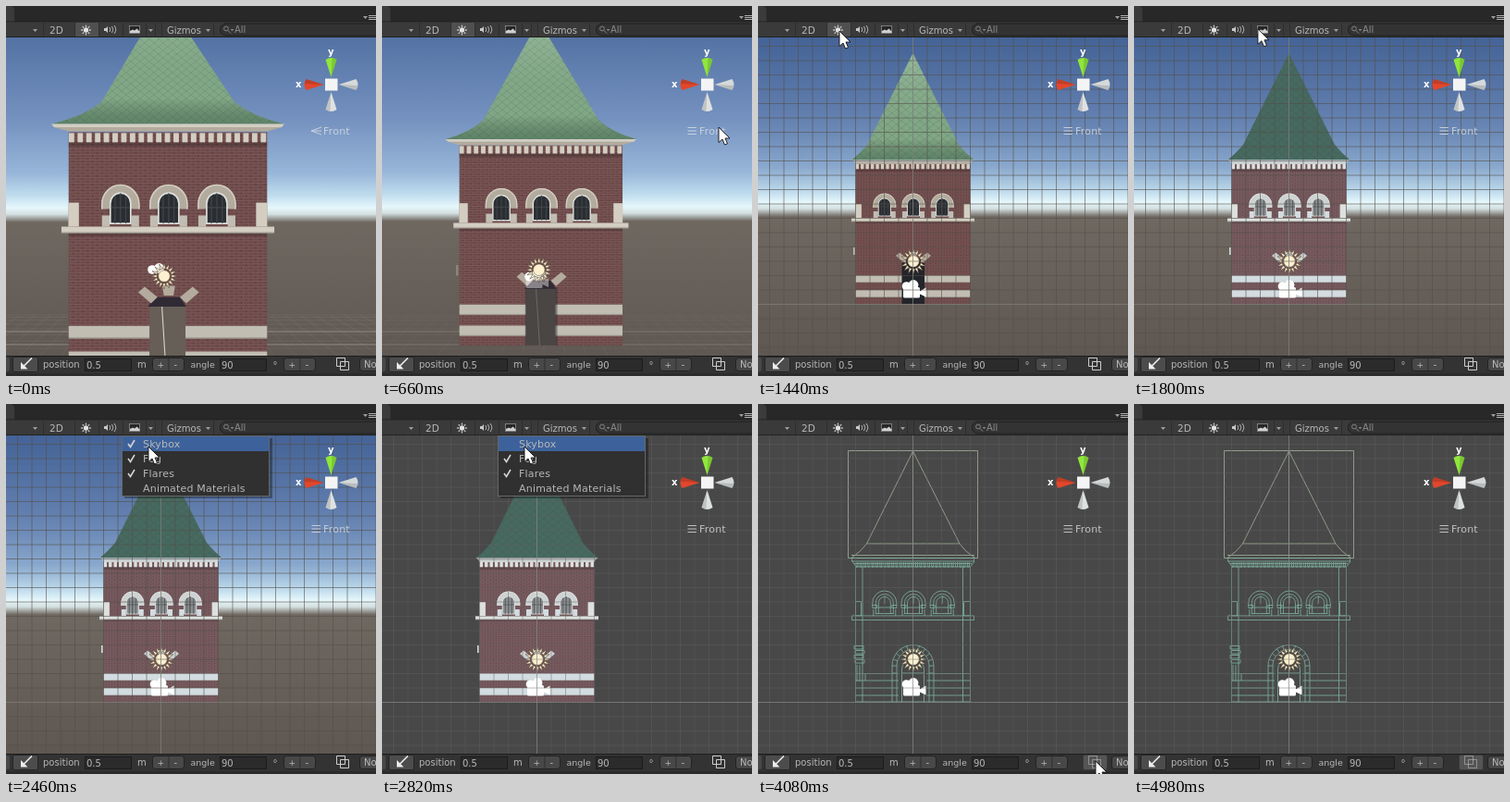
Write an HTML page that moves like this. It is 400 px wide and 400 px high and loops after 6360 ms.

```html
<!DOCTYPE html>
<html lang="en">
<head>
<meta charset="utf-8">
<title>Scene view</title>
<style>
html, body { margin: 0; width: 100%; height: 100%; overflow: hidden; background: #282828; }
svg { display: block; width: 100vw; height: 100vh; }
text { font-family: "DejaVu Sans", sans-serif; font-size: 10px; fill: #b8b8b8; white-space: pre; }
.big { font-size: 11px; letter-spacing: .2px; }
#model { --wall: #6d4949; --stone: #c1bdb3; --trim: #d3cec1; --arch: #b3ab9d; --roof: #86ae8b; --glass: #2a2e32; --bars: #43474b; --door: #23252a; }
#model.flat { --wall: #705459; --stone: #d3dce0; --trim: #dde0de; --arch: #cdd2d2; --roof: #47695f; --glass: #8b9092; --bars: #45484c; }
#model.flat #shade, #model.flat #opening { display: none; }
#wire path { fill: none; stroke: #7fb3a3; stroke-width: .8; }
</style>
</head>
<body>
<svg id="stage" viewBox="0 0 400 400"></svg>
<script>
const rect = (x, y, w, h, fill, more = '') => `<rect x="${x}" y="${y}" width="${w}" height="${h}" fill="${fill}" ${more}/>`;
const path = (d, fill = 'none', more = '') => `<path d="${d}" fill="${fill}" ${more}/>`;
const disc = (x, y, r, fill, more = '') => `<circle cx="${x}" cy="${y}" r="${r}" fill="${fill}" ${more}/>`;
const text = (x, y, s, more = '') => `<text x="${x}" y="${y}" ${more}>${s}</text>`;
const rep = (n, f) => Array.from({ length: n }, (_, i) => f(i)).join('');
const box = (x, y, w, h) => `M${x} ${y}h${w}v${h}h${-w}z`;
const drop = (x, y) => path(`M${x} ${y}h5l-2.5 3z`, '#a0a0a0');
const rays = (n, r1, r2, w) => rep(n, i => path(`M${-w} ${-r1}L0 ${-r2}L${w} ${-r1}z`, 'inherit', `transform="rotate(${i * 360 / n})"`));

const MID = 167.5, BASE = 322, CELL = 15.5;
const windows = [136.8, 168, 199.2];

function arch(x, r, y, foot) {
  return `M${x - r} ${foot}V${y}A${r} ${r} 0 0 1 ${x + r} ${y}V${foot}`;
}

function windowShape(x) {
  return path(arch(x, 12.4, 215, 218) + 'z', 'var(--arch)') +
    path(arch(x, 12, 215, 218), 'none', 'stroke="var(--trim)" stroke-width=".9"') +
    rect(x - 8.2, 218, 16.4, 10.5, 'var(--wall)') +
    rect(x - 12, 222, 5, 7, 'var(--stone)') + rect(x + 7, 222, 5, 7, 'var(--stone)') +
    path(arch(x, 6.6, 214.5, 227) + 'z', 'var(--glass)', 'stroke="#dfe2de" stroke-width="1"') +
    path(`M${x} 208v19M${x - 3.5} 210v17M${x + 3.5} 210v17M${x - 6} 217h12`, 'none', 'stroke="var(--bars)" stroke-width=".7"');
}

function band(y) {
  return rect(105.5, y, 124, 8, 'var(--stone)') + rect(105.5, y + 7.2, 124, .8, '#0003');
}

function building() {
  return `<g id="walls">` +
    rect(105.5, 170, 124, 152, 'var(--wall)') + rect(105.5, 170, 124, 152, 'url(#brick)') +
    rect(105.5, 176, 124, 3, '#0003') + rect(105.5, 233, 124, 2, '#0003') +
    rep(23, i => rect(105.6 + i * 5.45, 170.5, 3.4, 5.8, 'var(--trim)')) +
    `<g id="panes">${windows.map(windowShape).join('')}</g>` +
    rect(105.3, 214, 6.6, 15, 'var(--trim)') + rect(222.6, 214, 7, 15, 'var(--trim)') +
    rect(101, 229, 133, 4.2, 'var(--trim)') + rect(101, 232.4, 133, .8, '#0004') +
    rect(103, 261, 1.6, 8, 'var(--stone)', 'id="notch"') + band(291) + band(307) +
    '<g id="opening">' + rect(156, 278, 22.5, 44, '#665e57') +
    path('M163.8 279L166.5 322', 'none', 'id="path" stroke="#d8d8d0" stroke-width=".6"') +
    rect(155.5, 278, 24.5, 44, 'var(--door)', 'id="door"') +
    path('M159 273H175L179 279H155z', '#302a34') + '</g>' +
    path('M149 270L153 266.5L161 273L157 277zM187 270L183 266.5L175 273L179 277zM165 272L164 266H172L171 272z', 'var(--arch)') + '</g>' +
    path('', 'var(--roof)', 'id="roof"') + path('', 'url(#tiles)', 'id="roofTiles"') + path('', 'url(#roofShade)', 'id="shade"') +
    path('', 'var(--arch)', 'id="soffit"') + path('', 'var(--trim)', 'id="slab"');
}

function wires() {
  const roof = `${box(97.5, 50.5, 140, 116)}M167.5 51L117.5 151H218L167.5 51V166M117.5 151Q112 159 101.5 166M218 151Q223 159 234 166M101 163.5H234`;
  const eave = box(101.5, 166.5, 132, 3.5) + 'M102 170L106 176H229.5L234 170M104 172.5H231' + rep(29, i => `M${106 + i * 4.3} 171v5h2v-5`);
  const wall = 'M105.5 176V322H229.5V176M113 176V322M221.5 176V322' + box(101.5, 229, 132, 4.5) + box(105.5, 213.5, 6, 15.5) + box(222.5, 213.5, 7, 15.5);
  const win = windows.map(x => arch(x, 13, 215, 218) + arch(x, 9.5, 215, 227) + arch(x, 6.5, 215, 227) +
    box(x - 13, 217.5, 5, 3) + box(x + 8, 217.5, 5, 3) + `M${x - 12} 222v7M${x + 12} 222v7M${x - 10} 226.5h20M${x - 7} 220h14M${x} 207v9`).join('');
  const bands = [291.5, 299, 307, 315].map(y => `M105.5 ${y}H152M182 ${y}H229.5`).join('');
  const door = arch(167.5, 22.5, 283, 322) + arch(167.5, 17.5, 283, 322) + arch(167.5, 12, 287, 322) +
    rep(11, i => { const a = Math.PI * i / 10, c = Math.cos(a), s = Math.sin(a); return `M${167.5 + 17.5 * c} ${283 - 17.5 * s}L${167.5 + 22.5 * c} ${283 - 22.5 * s}`; }) +
    'M145 291H150M185 291H190M156 291H179M167.5 262V322';
  const steps = rep(4, i => box(104 + (i % 2), 261.5 + i * 5, 10, 3.5)) + 'M107 282V300M110 282V300M116 291V299';
  return path(roof, 'none', 'style="stroke:#a3b39c"') + path(eave + wall + win + bands + door + steps);
}

function cone(angle, fill) {
  return `<g transform="translate(351.5 85) rotate(${angle})">` + path('M-6 -27L0 -8L6 -27Q0 -31 -6 -27z', fill) +
    path('M1 -28.5L0 -8L6 -27Q4 -28.5 1 -28.5z', '#0002') + '</g>';
}

function compass() {
  return cone(0, '#8fe63c') + cone(-90, '#e2472c') + cone(90, '#d5d9da') + cone(180, '#dfe2e2') +
    rect(345, 78.5, 13.5, 13, '#f4f4f4') +
    text(348, 53, 'y', 'font-weight="bold" style="fill:#fff"') + text(313, 88, 'x', 'font-weight="bold" style="fill:#fff"') +
    text(343, 139, 'Front', 'class="big" style="fill:#dcdfe2" opacity=".8"') +
    path('M341 131L330 135L341 139M332 135H341', 'none', 'id="persp" stroke="#dcdfe2" opacity=".8"') +
    path('M330.5 131.5h9.5m-9.5 3.5h9.5m-9.5 3.5h9.5', 'none', 'id="ortho" stroke="#dcdfe2" opacity=".8"');
}

function gizmos() {
  return `<g id="camBody">` + rect(157, 304, 18, 11.5, '#fff', 'rx="1.5"') + path('M174 309L181.5 304.5V314.5L174 311z', '#fff') + `</g>` +
    `<g id="camTop">` + disc(160.5, 303, 4.8, '#fff') + disc(168, 301.5, 5.4, '#fff') + '</g>' +
    `<g id="sun" fill="#fdf0cf" stroke="#4a4030" stroke-width=".5">` + rays(16, 8, 14, 1.5) + disc(0, 0, 6.3, '#fdf0cf') + '</g>';
}

function topBar() {
  return rect(0, 0, 400, 34, '#282828') + path('M0 0H6Q9 1 9 5V17H0z', '#3b3b3b') +
    rect(0, 17, 400, 17, '#3a3a3a') + rect(0, 16.5, 400, .8, '#1e1e1e') + rect(0, 33, 400, 1, '#222') +
    [40, 74, 100, 126, 151, 161, 168, 224].map(x => rect(x, 18, .8, 15, '#2c2c2c')).join('') +
    drop(386, 11) + path('M392 10.5h8m-8 2h8m-8 2h8', 'none', 'stroke="#b0b0b0"') +
    drop(29, 25) + text(47, 29.5, '2D', 'style="font-size:10.5px"') +
    rect(75, 18, 25, 15, '#505050', 'id="lightOn"') +
    `<g transform="translate(86.5 26)" fill="#e2e2e2">` + rays(8, 3.6, 6, .9) + disc(0, 0, 2.7, '#e2e2e2') + '</g>' +
    path('M106 24h2l2-2v7l-2-2h-2z', '#c8c8c8') + path('M112 23q1.500 2.500 0 5M114.500 22q2.500 3.500 0 7M117 21q3.500 4.500 0 9', 'none', 'stroke="#c0c0c0" stroke-width=".9"') +
    rect(133.5, 21.5, 11, 8, '#262626', 'stroke="#909090" stroke-width=".8"') + path('M134 29v-2l3-1.500 2 1 2.500-2 3 3v1.500z', '#d0d0d0') +
    drop(154, 25) + text(174, 29.5, 'Gizmos') + drop(216, 25) +
    rect(231.5, 19, 180, 13, '#333', 'rx="6.5" stroke="#1f1f1f"') +
    disc(238, 24.5, 2.4, 'none', 'stroke="#8c8c8c" stroke-width=".9"') + path('M240 26.500l3 3', 'none', 'stroke="#8c8c8c"') + path('M242.500 25h4l-2 2z', '#8c8c8c') +
    text(247, 28.5, 'All', 'style="fill:#8c8c8c"');
}

const field = (x, w, s) => rect(x, 381.5, w, 13, '#2b2b2b', 'stroke="#1c1c1c"') + text(x + 1.5, 391.5, s);
const plusMinus = x => rect(x, 380.5, 34, 14, '#484848', 'rx="3" stroke="#222"') + rect(x + 17, 381, .8, 13, '#2a2a2a') +
  text(x + 5, 391, '+', 'style="font-size:9px"') + text(x + 23, 391, '-');

function bottomBar() {
  return rect(0, 378, 400, 22, '#333') + rect(0, 378, 400, 1, '#1f1f1f') + rect(0, 397, 400, 3, '#2b2b2b') +
    rect(-6, 380, 10, 15, '#484848', 'rx="2"') + rect(7.5, 379.5, 27, 16, '#4c4c4c', 'rx="2" stroke="#242424"') +
    path('M16 392.500V385L23.500 392.500z', '#eee') + path('M28 380.500L19 389.500', 'none', 'stroke="#eee" stroke-width="1.6"') +
    text(40, 391, 'position') + field(85.5, 50, '0.5') + text(142, 391, 'm') + plusMinus(158.5) +
    text(199.5, 391, 'angle', 'style="font-size:9.5px"') + field(231.5, 50, '90') + text(288.5, 392, '°') + plusMinus(300.5) +
    rect(351.5, 379.5, 26, 16, '#555', 'id="wireOn" rx="2" stroke="#3a3a3a"') +
    `<g id="wireIcon">` + path(box(357.5, 380.5, 9, 9) + box(361.5, 384.5, 9, 9), 'none', 'stroke="#ccc"') + '</g>' +
    rect(382.5, 380.5, 24, 14, '#484848', 'rx="3" stroke="#222"') + text(387, 391, 'No');
}

const items = ['Skybox', 'Fog', 'Flares', 'Animated Materials'];
function menu() {
  return rect(128, 37, 160, 65, '#0005') + rect(125.5, 34.5, 159, 65, '#303030', 'stroke="#666"') +
    rect(126, 35, 158, 16, '#3d629b', 'id="hot"') +
    items.map((s, i) => text(148, 47 + i * 16, s, 'class="big"') +
      (i < 3 ? path(`M132 ${43 + i * 16}l2.500 3.500l4.500 -7.500`, 'none', `id="tick${i}" stroke="#d4d4d4" stroke-width="1.6"`) : '')).join('');
}

const lines = rep(27, i => `M${MID + (i - 11) * CELL} 34V378`) + rep(23, i => `M0 ${BASE + .5 + (i - 18) * CELL}H400`);
const floor = rep(31, i => `M${175 + (i - 15) * 16} 335L${175 + (i - 15) * 23} 378`) + rep(8, i => `M0 ${334 + i * i * .45 + i * 2}H400`);

stage.innerHTML = `<defs>
  <clipPath id="view"><rect y="34" width="400" height="344"/></clipPath>
  <linearGradient id="sky" gradientUnits="userSpaceOnUse" x1="0" y1="34" x2="0" y2="378">
    <stop offset="0" stop-color="#5473a4"/><stop offset=".25" stop-color="#7491bf"/><stop offset=".42" stop-color="#97b6d8"/><stop offset=".49" stop-color="#bfdcee"/>
    <stop offset=".53" stop-color="#e6f7fc"/><stop offset=".55" stop-color="#d3dfe0"/><stop offset=".575" stop-color="#6f6861"/><stop offset="1" stop-color="#5f5751"/>
  </linearGradient>
  <linearGradient id="dusk" x1="0" y1="0" x2="0" y2="1">
    <stop offset="0" stop-color="#1d3b73" stop-opacity=".3"/><stop offset=".6" stop-color="#1d3b73" stop-opacity=".2"/><stop offset="1" stop-color="#1d3b73" stop-opacity="0"/>
  </linearGradient>
  <linearGradient id="roofShade" x1="0" y1="0" x2="0" y2="1">
    <stop offset="0" stop-color="#fff" stop-opacity=".14"/><stop offset=".8" stop-color="#000" stop-opacity=".04"/><stop offset="1" stop-color="#243" stop-opacity=".4"/>
  </linearGradient>
  <pattern id="brick" width="6" height="3.6" patternUnits="userSpaceOnUse"><path d="M0 .3H6M0 2.1H6M1.500 0V2M4.500 2V3.600" stroke="#b99" stroke-width=".4" opacity=".3"/><path d="M0 1.200H1.500M3 3H4.500" stroke="#211" opacity=".2"/></pattern>
  <pattern id="tiles" width="10" height="8" patternUnits="userSpaceOnUse"><path d="M0 0L5 4L10 0M0 8L5 4L10 8" fill="none" stroke="#1c3a30" stroke-width=".7" opacity=".2"/></pattern>
</defs>
${rect(0, 0, 400, 400, '#484848')}
<g clip-path="url(#view)">
  <g id="skybox">${rect(0, 0, 400, 410, 'url(#sky)', 'id="air"')}${rect(0, 34, 400, 178, 'url(#dusk)', 'id="dim"')}</g>
  <g id="ground" stroke="#d5d2c8" stroke-width=".7">${path(floor, 'none', 'opacity=".2"')}${path('M0 352H400M0 366H400')}</g>
  <g id="model">${building()}</g>
  <g id="wire">${wires()}</g>
  ${gizmos()}
  <g id="grid">${path(lines, 'none', 'id="mesh" stroke-width=".9"')}${path(`M0 322.500H400M${MID} 34V378`, 'none', 'stroke="#9a9c98" stroke-width=".8" opacity=".6"')}</g>
  ${compass()}
</g>
${topBar()}${bottomBar()}<g id="menu">${menu()}</g>
<g id="cursor">${path('M0 0V16.500L4 13L6.500 19L9.500 17.800L7 12H12z', '#fff', 'stroke="#111" stroke-width=".9"')}</g>`;

const $ = Object.fromEntries([...stage.querySelectorAll('[id]')].map(e => [e.id, e]));
const set = (id, key, value) => $[id].setAttribute(key, value);
const show = (id, on) => set(id, 'visibility', on ? 'visible' : 'hidden');
const mix = (a, b, k) => a + (b - a) * k;
const clamp = v => Math.min(1, Math.max(0, v));

const LOOP = 6360, STEP = 60;
const T = { ortho: 660, unlit: 1560, open: 2160, noSky: 2820, close: 3480, wire: 3900, out: 4980 };
const moves = [[0, 402, 84], [60, 396, 92], [300, 364, 131], [660, 364, 131], [840, 79, 65], [1260, 86, 30], [1320, 86, 30],
  [1440, 88, 27], [1560, 88, 27], [1920, 150, 24], [1980, 154, 24], [2160, 154, 25], [2460, 154, 46], [2820, 154, 46],
  [3360, 279, 390], [3480, 290, 392], [3840, 365, 386], [4740, 365, 386], [4980, 402, 290], [LOOP, 402, 290]];

function pointer(t) {
  const i = moves.findIndex(m => m[0] > t), [t0, x0, y0] = moves[i - 1], [t1, x1, y1] = moves[i];
  const u = (t - t0) / (t1 - t0), k = u * u * (3 - 2 * u);
  return [mix(x0, x1, k), mix(y0, y1, k)];
}

// p: share of perspective left, q: the slower share for near parts
function pose(p, q) {
  const s = 1 + .73 * p, cx = mix(MID, 175, p);
  set('walls', 'transform', `translate(${cx} ${mix(231, 242, p)}) scale(${s}) translate(${-MID} -231)`);
  set('panes', 'transform', `translate(168 0) scale(${1 - .035 * p} 1) translate(-168 0)`);
  const ex = 66 * (s + .18 * q), ey = mix(166.5, 127.5, p);
  const tip = [mix(MID, 171, p), mix(51, -10, p)], kx = mix(49.5, 72, p), ky = mix(150, 104, p), bend = kx * mix(1.16, 1.3, p);
  const d = `M${tip}L${cx - kx} ${ky}Q${cx - bend} ${ey - 7} ${cx - ex} ${ey}H${cx + ex}Q${cx + bend} ${ey - 7} ${cx + kx} ${ky}z`;
  for (const id of ['roof', 'roofTiles', 'shade']) set(id, 'd', d);
  const h = 2 * s, w = 62 * s;
  set('slab', 'd', `M${cx - ex} ${ey}h${2 * ex}l-3 ${h}h${6 - 2 * ex}z`);
  set('soffit', 'd', `M${cx - ex + 3} ${ey + h}H${cx + ex - 3}L${cx + w} ${ey + h * 2.3}H${cx - w}z`);
  set('sun', 'transform', `translate(${mix(168, 171, p)} ${mix(276, 292, p)})`);
  const shift = `translate(${-2.5 * p} ${-18 * p})`;
  set('camTop', 'transform', shift);
  set('camBody', 'transform', shift);
  for (const id of ['camBody', 'door', 'notch']) set(id, 'opacity', 1 - p);
  set('path', 'opacity', p);
  set('ground', 'opacity', p * .6);
  set('air', 'transform', `translate(0 ${6 * q - 4})`);
}

function draw(now) {
  const t = Math.floor(now % LOOP / STEP) * STEP;
  const left = 1 - clamp((t - 600) / 360), fade = clamp((t - 900) / 360);
  pose(left ** 3, left ** 1.25);

  const sky = t < T.noSky, wire = t >= T.wire, open = t >= T.open && t < T.close;
  show('persp', t < T.ortho);
  show('ortho', t >= T.ortho);
  show('skybox', sky);
  set('dim', 'opacity', fade);
  set('grid', 'opacity', fade);
  set('mesh', 'stroke', sky ? '#54504b' : '#606060');
  set('mesh', 'opacity', sky ? .65 : .5);
  show('lightOn', t < T.unlit);
  set('model', 'class', t < T.unlit ? '' : 'flat');
  set('model', 'display', wire ? 'none' : 'inline');
  show('wire', wire);
  show('wireOn', wire);
  set('wireIcon', 'opacity', wire ? .5 : 1);

  const [x, y] = pointer(t), row = Math.floor((y - 35) / 16);
  set('menu', 'display', open ? 'inline' : 'none');
  set('hot', 'display', row >= 0 && row < 4 && x < 284 ? 'inline' : 'none');
  set('hot', 'y', 35 + row * 16);
  set('tick0', 'display', sky ? 'inline' : 'none');
  set('cursor', 'transform', `translate(${x} ${y})`);
  show('cursor', t >= 60 && t < T.out);
}

const start = performance.now();
function tick() {
  draw(performance.now() - start);
  requestAnimationFrame(tick);
}
tick();
</script>
</body>
</html>
```
